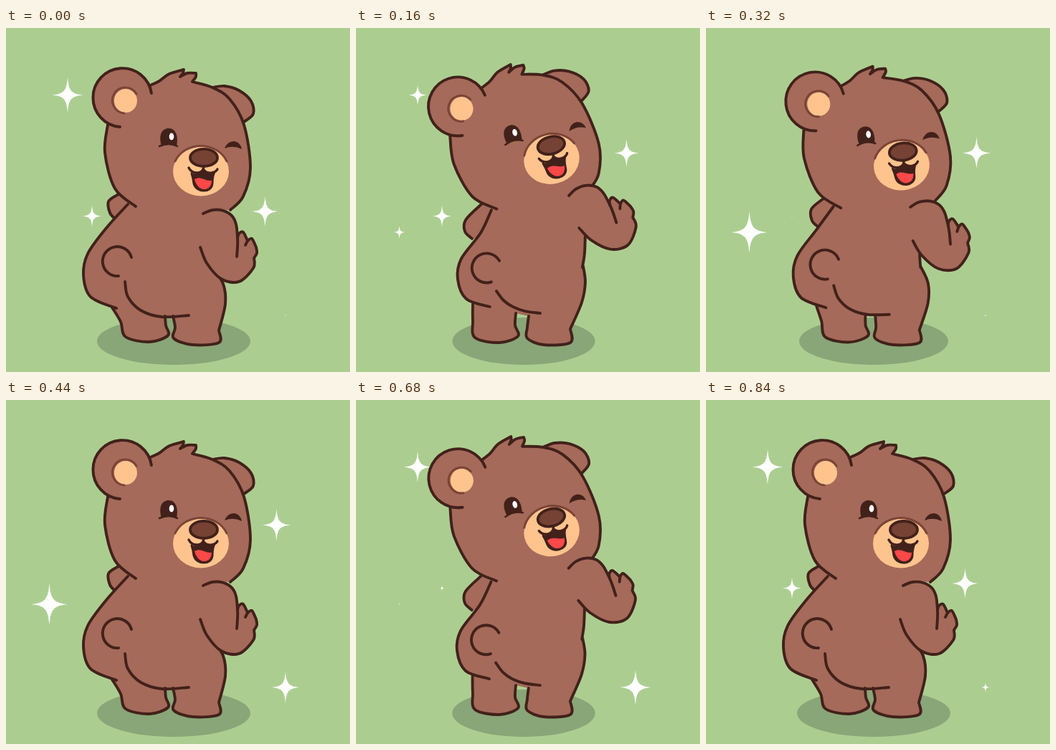
Animation of 480x480 px, one loop 880 ms. Source, as an HTML page:

```html
<!DOCTYPE html>
<html lang="en">
<head>
<meta charset="utf-8">
<title>Dancing bear</title>
<style>
html, body { margin: 0; width: 100%; height: 100%; overflow: hidden; background: #abce90; }
svg { display: block; width: 100%; height: 100%; }
path { stroke-linecap: round; stroke-linejoin: round; }
</style>
</head>
<body>
<svg id="stage" viewBox="0 0 480 480"></svg>
<script>
const LOOP = 880, STEP = 40, SWAY = 440;
const INK = '#42211b', FUR = '#a56a59', PEACH = '#ffc48d', SOFT = '#7b4437';
const stage = document.getElementById('stage');

function add(parent, tag, attrs) {
  const el = document.createElementNS('http://www.w3.org/2000/svg', tag);
  for (const k in attrs) el.setAttribute(k, attrs[k]);
  return parent.appendChild(el);
}
const group = () => add(stage, 'g', {});
const fill = (g, d, color = FUR) => add(g, 'path', { d, fill: color });
const line = (g, d, color = INK, width = 3.9) =>
  add(g, 'path', { d, fill: 'none', stroke: color, 'stroke-width': width });
const oval = (g, cx, cy, rx, ry, color, more) => add(g, 'ellipse', { cx, cy, rx, ry, fill: color, ...more });

const mix = (a, b, k) => a + (b - a) * k;
const smooth = (a, b, t) => {
  const u = Math.max(0, Math.min(1, (t - a) / (b - a)));
  return u * u * (3 - 2 * u);
};
const points = s => s.trim().split(' ').map(p => p.split(',').map(Number));

// Smooth curve through the points, opened with the given command.
function curve(pts, open = 'M') {
  const at = i => pts[Math.max(0, Math.min(pts.length - 1, i))];
  let d = open + pts[0];
  for (let i = 0; i < pts.length - 1; i++) {
    const [p, a, b, q] = [at(i - 1), at(i), at(i + 1), at(i + 2)];
    d += 'C' + [a[0] + (b[0] - p[0]) / 6, a[1] + (b[1] - p[1]) / 6,
                b[0] - (q[0] - a[0]) / 6, b[1] - (q[1] - a[1]) / 6, ...b];
  }
  return d;
}
// Pieces separated by '|' meet in sharp corners.
const trace = s => s.split('|').map((p, i) => curve(points(p), i ? 'L' : 'M')).join('');

// Ground and sparkles
const shadow = oval(stage, 234, 437, 107, 33, '#88a677');
const GROW = 190, LIFE = 425;
const sparkles = [
  [86, 93.5, 21.5, 530], [120, 262.5, 13, 617], [361.5, 256, 18.5, 495],
  [390, 401, 21.5, 290], [377.5, 174.5, 19.5, 10], [60.5, 285, 25.5, 90]
].map(([x, y, r, born]) => ({
  x, y, r, born, el: fill(stage, 'M0-1C.07-.25 .22-.07 1 0C.22 .07 .07 .25 0 1C-.07 .25-.22 .07-1 0C-.22-.07-.07-.25 0-1Z', '#fff')
}));

// Torso: each line bends between the two ends of the sway.
const bend = (a, b) => ({ a: points(a), b: points(b) });
const at = (m, k) => m.a.map((p, i) => p.map((v, j) => mix(v, m.b[i][j], k)));
const farArm = bend('157,232 143,242 145,258 152,266', '175,246 153,268 152,284 162,294');
const farBack = bend('175,275 175,246', '180,292 194,254');
const side = bend('170,246 140,279 114,315 108,345 118,375 154,391', '189,254 174,286 147,322 142,350 154,378 187,389');
const legL = bend('148,390 160,410 167,431 200,438 226,429 223,415 222,402',
                  '163,385 163,408 166,432 200,439 226,430 222,415 223,398');
const legR = bend('233,402 236,418 234,433 260,442 297,439 297,422', '241,402 239,418 239,433 262,442 299,439 299,420');
const hip = bend('297,422 306,385 303,357 288,334', '299,420 315,383 320,355 317,332');
const waist = bend('288,334 284,318 285,300', '316,334 319,315 320,290');
const chest = bend('310,260 250,230 181,245', '325,235 260,225 196,250');
const rump = bend('166,354 170,375 188,394 217,403 255,401', '196,367 206,380 219,389 236,395 257,398');

const torso = group();
const outlines = [
  [fill(torso, ''), [farArm, farBack], 'L'],
  [line(torso, ''), [farArm], 'M'],
  [fill(torso, ''), [side, legL, legR, hip, waist, chest], 'L'],
  [line(torso, ''), [side, legL, legR, hip, waist, rump], 'M']
];

// Tail, head and arm are rigid and swing about a pivot.
const tail = group();
line(tail, 'M175 320A20.5 20.5 0 1 0 157 346');

const head = group();
const earR = trace('288,83 305,81 325,87 342,102 345,120 332,131');
const earL = 'M159 138A41 41 0 1 1 203 91';
const cheek = '181,249 152,224 138,174 142,135';
const crown = '201,80 214,74 228,64 248,58 | 248,58 247,63 243,68 | 243,68 253,63 265,63 | ' +
  '265,63 265,68 260,75 | 260,75 288,83 312,99 332,135 341,195 331,235 313,254';
fill(head, earR);
line(head, earR);
fill(head, trace(cheek + '|' + crown));
line(head, trace(cheek));
line(head, trace(crown));
fill(head, earL);
line(head, earL);
oval(head, 167, 101.5, 16, 16.5, PEACH);
line(head, 'M182 92A18 18 0 1 0 165 119', SOFT, 3);

// Face
const dark = { stroke: INK, 'stroke-width': 3.8 };
oval(head, 272, 200, 39, 34.5, PEACH);
line(head, 'M236 186A39 35 0 0 1 308 186', SOFT, 3);
fill(head, 'M217 165C212 147 219 140 227 140C237 140 241 151 238 165Q228 160 217 165Z', INK);
line(head, 'M214 165Q227 159 239 165', INK, 2.5);
oval(head, 231, 151.5, 3.3, 5, '#fff');
fill(head, 'M305 168Q309 158 318 158Q327 159 329 169Q317 163 305 168Z', INK);
const lips = 'M259 203Q271 204 276 199Q282 204 291 201';
fill(head, lips + 'Q288 207 288 217C287 231 265 230 262 217Z', INK);
line(head, 'M259 203Q261 209 262 217C265 230 287 231 288 217Q288 207 291 201', INK, 3);
fill(head, 'M263 211C272 206 277 214 287 213C287 228 268 231 263 211Z', '#fb4848');
line(head, 'M255 195Q259 203 268 202Q276 201 276 192M276 198Q280 203 287 202Q293 201 295 197', INK, 3.4);
oval(head, 276, 181, 19, 12, '#764233', dark);

const arm = group();
const shoulder = '275,259 288,254 303,255 315,262 321,274 323,293';
const hand = '323,293 325,287 331,285 337,297 | 337,297 343,294 349,306 | 349,306 350,314 346,321 | ' +
  '346,321 345,335 325,354 300,350 280,328 271,306';
fill(arm, trace(shoulder + '|' + hand));
line(arm, trace(shoulder + ' 323,305 322,319'));
line(arm, trace(hand));
line(arm, 'M337 297L334 303');

const swing = (el, deg, x, y) => el.setAttribute('transform', `rotate(${deg} ${x} ${y})`);

function draw(now) {
  const t = Math.floor((now % LOOP) / STEP) * STEP;
  const s = t % SWAY;
  const k = smooth(-4, 166, s) - smooth(222, 396, s);

  for (const [el, lines, open] of outlines)
    el.setAttribute('d', lines.map((m, i) => curve(at(m, k), i ? open : 'M')).join(''));
  swing(tail, -14 * k, 207, 220);
  swing(head, -13.9 * (k + .3 * k * (1 - k)), 203, 187.4);
  swing(arm, -22.5 * k, 223, 191);
  shadow.setAttribute('rx', mix(107, 99.5, k));

  for (const p of sparkles) {
    const age = (t - p.born + LOOP) % LOOP;
    const z = p.r * (smooth(0, GROW, age) - smooth(LIFE, LIFE + GROW, age));
    p.el.setAttribute('transform', `translate(${p.x} ${p.y}) scale(${z} ${z * 1.15})`);
  }
}

let start;
function tick(now) {
  if (start === undefined) start = now;
  draw(now - start);
  requestAnimationFrame(tick);
}
draw(0);
requestAnimationFrame(tick);
</script>
</body>
</html>
```
